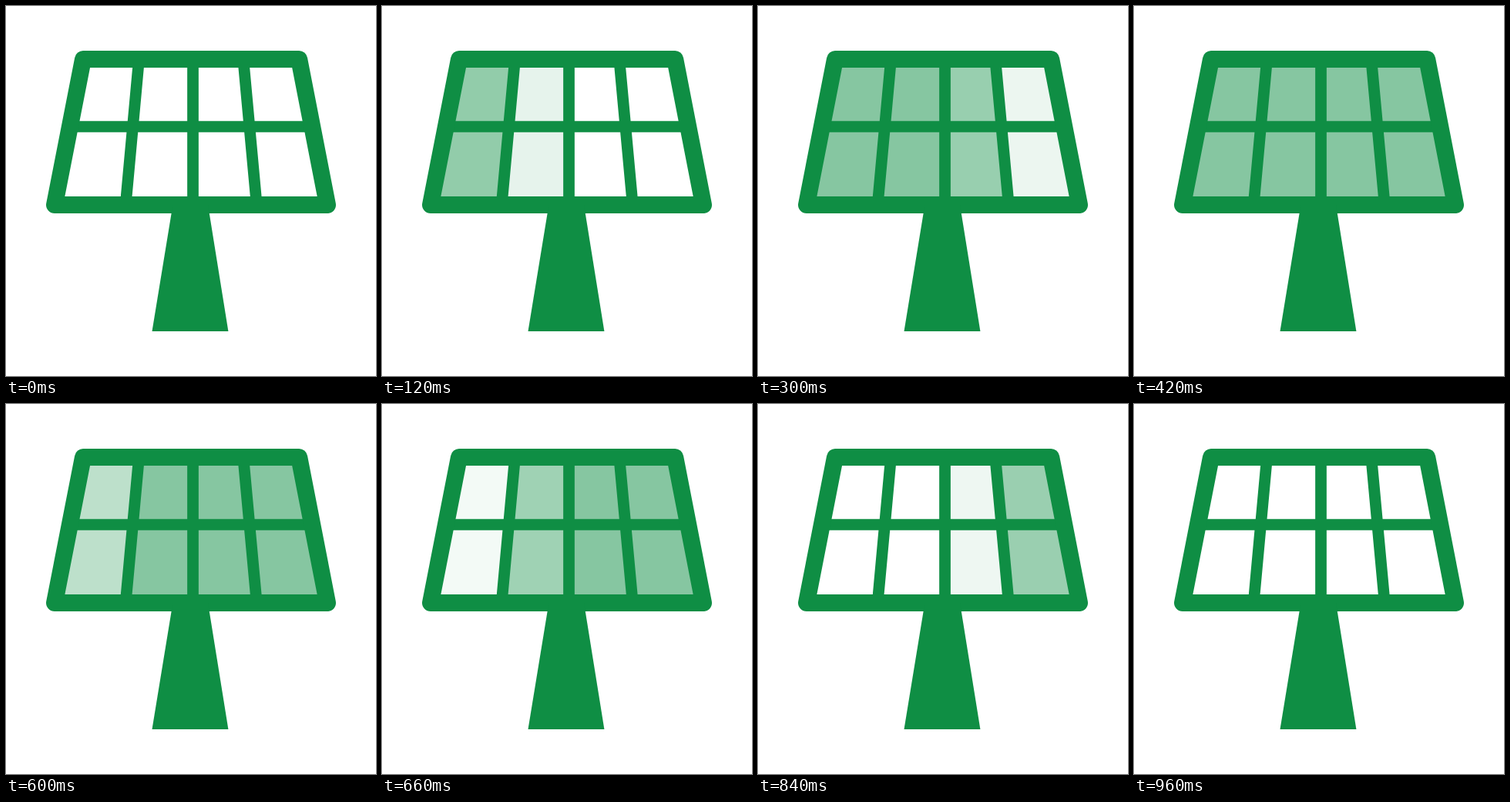
An HTML page for the animation above (1020 ms loop, 480 px wide and 480 px high).

```html
<!DOCTYPE html>
<html lang="en">
<head>
<meta charset="utf-8">
<title>Solar panel</title>
<style>
  html, body { margin: 0; width: 100%; height: 100%; overflow: hidden; background: #fff; }
  svg { display: block; width: 100vw; height: 100vh; }
</style>
</head>
<body>
<svg viewBox="0 0 480 480">
  <g id="panes" fill="#0f8e44"></g>
  <g fill="none" stroke="#0f8e44" stroke-width="14.7">
    <path d="M172.5 69L155.2 258M242.5 69V258M307.8 69L325.2 258M81 156.5H399"/>
    <path d="M100 69H380.2L417 258H63Z" stroke-width="22" stroke-linejoin="round"/>
  </g>
  <path d="M216.4 258H262L288.4 422H189.5Z" fill="#0f8e44"/>
</svg>
<script>
  const LOOP = 1020, STEP = 60;
  const FADE = 133, STAGGER = 93, OUT = 540, PEAK = 0.5;
  const top4 = [100, 172.5, 242.5, 307.8, 380.2];
  const bottom4 = [63, 155.2, 242.5, 325.2, 417];

  const group = document.getElementById('panes');
  const columns = [0, 1, 2, 3].map(i => {
    const p = document.createElementNS('http://www.w3.org/2000/svg', 'path');
    p.setAttribute('d',
      `M${top4[i]} 69H${top4[i + 1]}L${bottom4[i + 1]} 258H${bottom4[i]}Z`);
    return group.appendChild(p);
  });

  const ramp = (t, start) => Math.min(1, Math.max(0, (t - start) / FADE));

  function draw(now) {
    const t = Math.floor((now % LOOP) / STEP) * STEP;
    columns.forEach((p, i) => {
      const start = i * STAGGER;
      const level = ramp(t, start) - ramp(t, OUT + start);
      p.setAttribute('fill-opacity', PEAK * level);
    });
  }

  const begin = performance.now();
  function tick() {
    draw(performance.now() - begin);
    requestAnimationFrame(tick);
  }
  tick();
</script>
</body>
</html>
```
